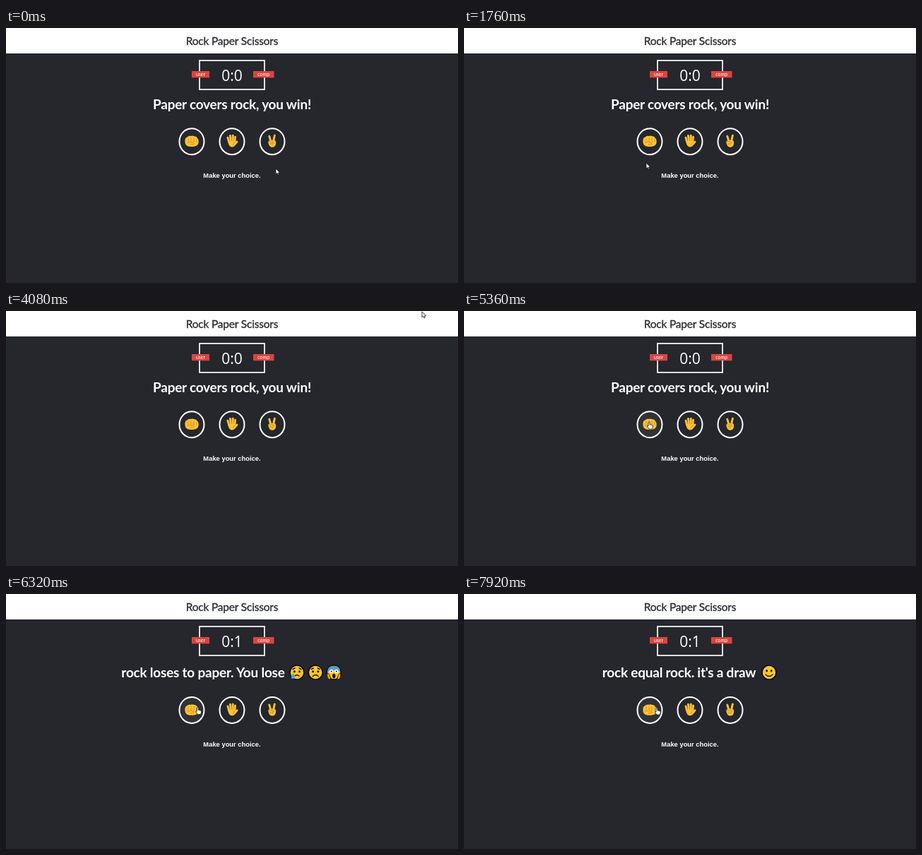
These frames come from a looping animation (640 by 361 pixels, 8000 ms). An HTML page:

```html
<!DOCTYPE html>
<html lang="en">
<head>
<meta charset="utf-8">
<title>Rock Paper Scissors</title>
<style>
  html, body { margin: 0; width: 100%; height: 100%; overflow: hidden; background: #25272d; }
  svg { display: block; width: 640px; height: 361px; }
  text { font-family: Lato, "Open Sans", sans-serif; fill: #fff; text-anchor: middle; }
  .title { font-size: 15.5px; letter-spacing: -.012em; fill: #25272d; stroke: #25272d; stroke-width: .3; }
  .heading { font-size: 19px; font-weight: 700; letter-spacing: -.012em; }
  .badge { font-size: 7px; }
  .ring { fill: none; stroke: #fff; stroke-width: 2; }
  .skin { fill: #fdc236; }
  .crease { fill: none; stroke: #c98420; stroke-width: .8; stroke-linecap: round; }
  .finger { fill: none; stroke: #fdc236; stroke-linecap: round; stroke-width: 2.9; }
  .face { fill: #fcc52f; stroke: #0c0c0e; stroke-width: 1.6; }
  .ink { fill: none; stroke: #1d1713; stroke-width: 1.4; stroke-linecap: round; }
  .dot { fill: #1d1713; }
  .tear { fill: #38a9e8; }
  .cursor { fill: #fff; stroke: #15161a; stroke-width: .8; stroke-linejoin: round; }
</style>
</head>
<body>
<svg viewBox="0 0 640 361">
  <rect width="640" height="36" fill="#fff"/>
  <text class="title" x="320" y="24">Rock Paper Scissors</text>

  <rect x="274" y="46" width="92" height="41" fill="none" stroke="#fff" stroke-width="1.7"/>
  <text id="score" x="320" y="74.5" style="font:21px 'Open Sans',sans-serif"></text>
  <g fill="#da4540">
    <rect x="263" y="61" width="25" height="9.3"/>
    <rect x="350" y="61" width="29.5" height="9.3"/>
  </g>
  <text class="badge" x="275.5" y="68">user</text>
  <text class="badge" x="364.8" y="68">comp</text>

  <g id="start"><text class="heading" x="320" y="114.8">Paper covers rock, you win!</text></g>
  <g id="lose">
    <text class="heading" x="279" y="117.5">rock loses to paper. You lose</text>
    <g transform="translate(412 111)">
      <circle class="face" r="10"/>
      <path class="ink" d="M-6-4.5L-3-6M6-4.5L3-6M-3 5Q0 2.5 3 5"/>
      <circle class="dot" cx="-3.6" cy="-1.2" r="1.5"/><circle class="dot" cx="3.6" cy="-1.2" r="1.5"/>
      <path class="tear" d="M-5.3 1Q-9.5 6-7.5 8.6Q-4.5 10.2-3.5 7Q-3.5 4.5-5.3 1Z"/>
    </g>
    <g transform="translate(438.3 111)">
      <circle class="face" r="10"/>
      <path class="ink" d="M-6-4.5L-3-6M6-4.5L3-6M-4 5.5Q0 1.5 4 5.5"/>
      <circle class="dot" cx="-3.6" cy="-1.2" r="1.5"/><circle class="dot" cx="3.6" cy="-1.2" r="1.5"/>
    </g>
    <g transform="translate(464.3 111)">
      <circle class="face" r="10"/>
      <path d="M-9.2-1Q-8.8-9.2 0-9.2T9.2-1Q0-5-9.2-1Z" fill="#4f9fd8"/>
      <g fill="#fff"><circle cx="-3.6" cy="-1.6" r="2.6"/><circle cx="3.6" cy="-1.6" r="2.6"/></g>
      <circle class="dot" cx="-3.6" cy="-1.6" r="1"/><circle class="dot" cx="3.6" cy="-1.6" r="1"/>
      <ellipse class="dot" cy="5" rx="2.2" ry="3.3"/>
      <path d="M-9.5 1Q-6 1-4.5 9.8L-7.5 9.8Q-10.5 6-9.5 1ZM9.5 1Q6 1 4.5 9.8L7.5 9.8Q10.5 6 9.5 1Z" fill="#f5a623" stroke="#0c0c0e" stroke-width=".8"/>
    </g>
  </g>
  <g id="draw">
    <text class="heading" x="304.5" y="117.5">rock equal rock. it's a draw</text>
    <g transform="translate(432 111)">
      <circle class="face" r="10"/>
      <ellipse class="dot" cx="-3.3" cy="-2.2" rx="1.3" ry="1.8"/><ellipse class="dot" cx="3.3" cy="-2.2" rx="1.3" ry="1.8"/>
      <path class="ink" d="M-5 3Q0 8 5 3"/>
    </g>
  </g>

  <g id="choices">
    <g transform="translate(263 160.7)">
      <ellipse id="hover" rx="17" ry="18" fill="#303236"/>
      <ellipse id="rock" class="ring" rx="17.5" ry="18.5"/>
      <path class="skin" d="M-9.6-1Q-9.5-5.5-6.5-6.3Q-4.5-8.5-1.5-7.6Q1-9 3.5-7.4Q6.5-8 7.8-5Q9.8-4 9.7 0Q9.8 4 7.5 5.6Q4 7.8-1 7.2Q-6 7.6-8.2 4.8Q-9.8 2.5-9.6-1Z"/>
      <path class="crease" d="M-5-4.5V0M-1-5.2V.2M3-5V.2M6.8-3.5V.2M-6.5 1.5Q-1 .5 2.5 1.8Q4.5 3.6 1.5 4.2L-2 4.4"/>
    </g>
    <g transform="translate(320 160)">
      <ellipse class="ring" cy=".7" rx="17.5" ry="18.5"/>
      <path class="finger" d="M-4.5 1L-6-4.8M-1.6-1L-2.6-7.5M1.4-1L1.2-7.8M3.8 1L4.6-5.8M3.8 4.8L7 1"/>
      <path class="skin" d="M-6-.5H5.2V4Q4 8.6-.5 8.6Q-5 8-6-.5Z"/>
      <path class="crease" d="M-3.3-.5L-3.9-4M-.2-.8L-.5-5M2.7-.5L3-4M4.4 1.6Q1.7 3 1.5 5.5"/>
    </g>
    <g transform="translate(377 160)">
      <ellipse class="ring" cy=".7" rx="17.5" ry="18.5"/>
      <path class="finger" d="M-2.2 0L-4.2-6.8M1.6 0L3.4-7.8"/>
      <path class="skin" d="M-5.8 1Q-4.5-1.6 0-1Q4.8-2 5.2 1.8Q5.4 8.6 0 8.9Q-5 8.6-5.8 1Z"/>
      <path class="crease" d="M-4.8 1Q-1 .2 2.2 1.2Q3.2 2.6 1.3 3.2L-2 3.3M-2.3 3.4V5M1.3 3.2Q-.3 4.2 0 6"/>
    </g>
    <text x="320" y="211.9" style="font:bold 9.4px 'Liberation Sans',Arial,sans-serif">Make your choice.</text>
  </g>

  <path id="arrow" class="cursor" d="M0 0V8L1.9 6.3L3.1 9L4.4 8.4L3.3 5.9H5.8Z"/>
  <path id="hand" class="cursor" d="M-1 .5Q0-.8 1 .5V4Q2 3.3 2.7 4.3Q3.6 3.8 4.1 4.8Q5.2 4.5 5.2 5.8V7.5Q4.6 8.6 4.3 10H-.2Q-1 8.2-3 6Q-2.5 4.6-1 6Z"/>
</svg>
<script>
const LOOP = 8000, STEP = 80, FADE = 300, HOLD = 400;
const HOVER = 4960, LOSE = 5600, DRAW = 6480;
const WHITE = [255, 255, 255], RED = [232, 34, 60], GRAY = [70, 70, 71];
const clicks = [[5560, RED], [6440, GRAY], [7240, GRAY]];
const path = [ // time, x, y
  [0, 382, 199], [880, 258, 191], [3760, 258, 191], [4080, 589, 1], [4400, 589, 1],
  [4640, 290, 141], [4720, 290, 141], [5200, 262, 157], [6080, 262, 157], [6400, 273, 161], [LOOP, 273, 161]
];
const $ = id => document.getElementById(id);
const show = (id, on) => $(id).setAttribute('visibility', on ? 'visible' : 'hidden');
const clamp = p => Math.min(1, Math.max(0, p));
const smooth = p => p * p * (3 - 2 * p);
const ease = p => smooth(1 - (1 - clamp(p)) ** 2);

function cursorAt(t) {
  const i = path.findIndex(k => k[0] > t);
  const [t0, x0, y0] = path[i - 1], [t1, x1, y1] = path[i];
  const p = smooth((t - t0) / (t1 - t0));
  return [x0 + (x1 - x0) * p, y0 + (y1 - y0) * p];
}

function ringColor(t) {
  const click = clicks.findLast(c => c[0] <= t);
  if (!click) return '#fff';
  const age = t - click[0];
  const amount = ease(age / FADE) - ease((age - HOLD) / FADE);
  return `rgb(${WHITE.map((w, i) => w + (click[1][i] - w) * amount)})`;
}

function frame(now) {
  const t = Math.floor(now % LOOP / STEP) * STEP;
  const over = t >= HOVER;
  show('start', t < LOSE);
  show('lose', t >= LOSE && t < DRAW);
  show('draw', t >= DRAW);
  show('hover', over);
  show('hand', over);
  show('arrow', !over);
  $('score').textContent = t < LOSE ? '0:0' : '0:1';
  $('choices').setAttribute('transform', `translate(0 ${t < LOSE ? 0 : 3.7})`);
  $('rock').style.stroke = ringColor(t);
  $(over ? 'hand' : 'arrow').setAttribute('transform', `translate(${cursorAt(t)})`);
  requestAnimationFrame(frame);
}
requestAnimationFrame(frame);
</script>
</body>
</html>
```
